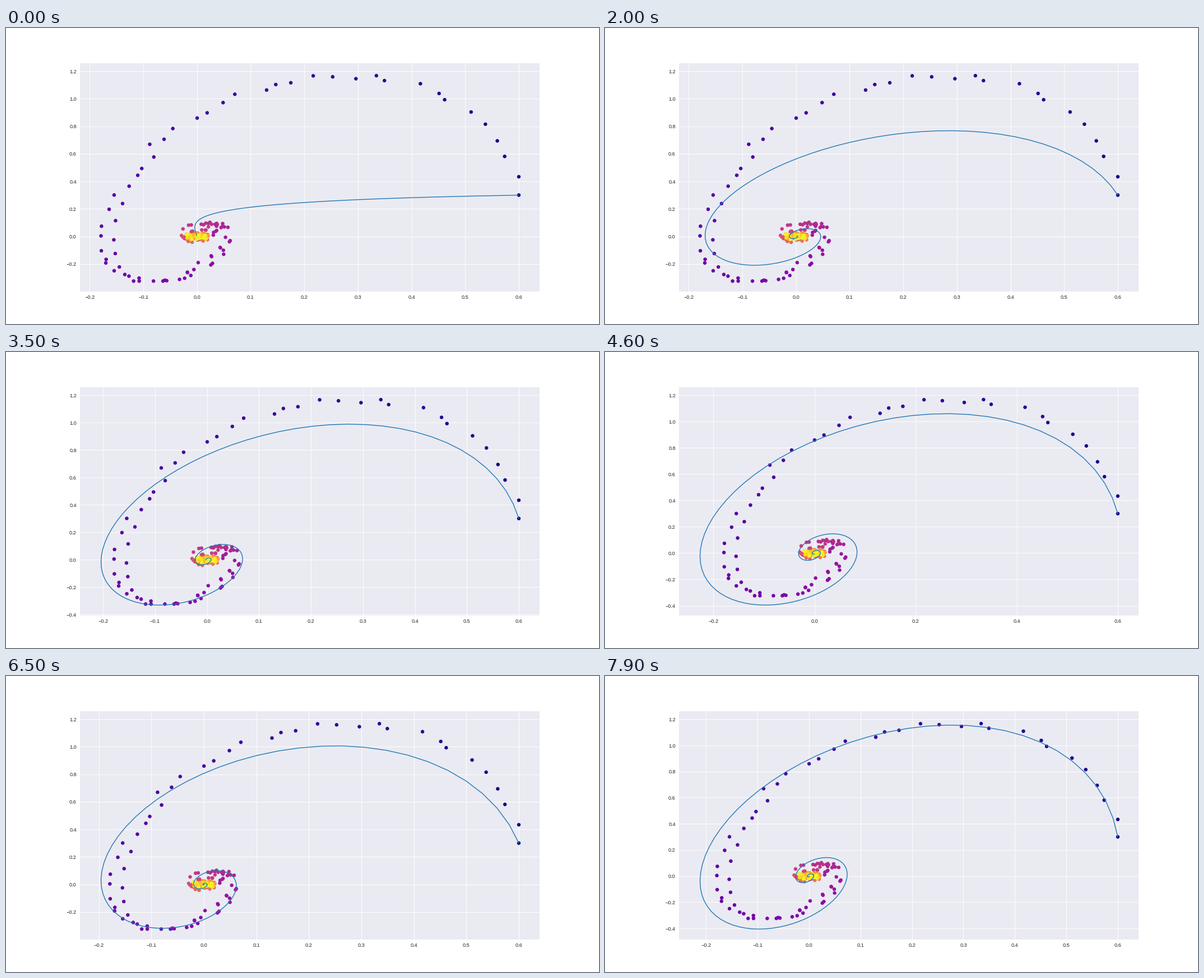
Recreate the animation shown at these times as a matplotlib script. Size 1058 by 529 pixels, loop 8000 ms.

```python
import numpy as np
import matplotlib.pyplot as plt
from matplotlib.animation import FuncAnimation

FRAMES, INTERVAL, STEPS = 80, 100, 200
START = np.array([0.6, 0.3])

# Extent of the noisy measurements
LOW, HIGH = np.array([-0.179, -0.3235]), np.array([0.6, 1.18])

# Linear system (x' = ax + by, y' = cx + dy per step) behind the measurements
TRUE_SYSTEM = -0.0025, -0.031, 0.298, -0.0704

# Key points of the learned coefficients, times in seconds
TIMES = [0, 0.9, 2.0, 3.5, 4.6, 5.8, 7.2, 7.9]
A_KEYS = [-0.0704, -0.05, -0.0016, 0.0029, 0.0038, -0.0124, 0.0007, 0.0063]
B_KEYS = [-0.0045, -0.036, -0.0372, -0.0348, -0.0364, -0.0475, -0.0328, -0.0347]
D_KEYS = [-0.0198, -0.07, -0.0565, -0.0587, -0.0591, -0.0651, -0.0688, -0.0674]

plt.rcParams.update({
    "font.family": "Liberation Sans",
    "font.size": 10,
    "axes.facecolor": "#eaeaf2",
    "axes.linewidth": 0,
    "axes.axisbelow": True,
    "axes.grid": True,
    "grid.color": "white",
    "grid.linewidth": 1,
    "xtick.color": "0.15",
    "ytick.color": "0.15",
    "xtick.major.size": 0,
    "ytick.major.size": 0,
    "xtick.major.pad": 7,
    "ytick.major.pad": 7,
    "lines.solid_capstyle": "round",
})


def trajectory(system):
    """Sample the linear system from START with an exact step matrix."""
    matrix = np.reshape(system, (2, 2))
    step, term = np.eye(2), np.eye(2)
    for n in range(1, 7):
        term = term @ matrix / n
        step = step + term
    path = [START]
    for _ in range(STEPS - 1):
        path.append(step @ path[-1])
    return np.array(path)


def learned_system(t):
    """The dominant coefficient c saturates; the others follow key points."""
    a, b, d = (np.interp(t, TIMES, keys) for keys in (A_KEYS, B_KEYS, D_KEYS))
    c = 0.005 + 0.295 * (1 - np.exp(-t / 2.9))
    return a, b, c, d


rng = np.random.default_rng(4)
data = trajectory(TRUE_SYSTEM) + rng.uniform(-0.02, 0.02, (STEPS, 2))
data = np.clip(data, LOW, HIGH)

fig, ax = plt.subplots(figsize=(16, 8), dpi=66.125)
fig.subplots_adjust(left=0.125, right=0.9, bottom=0.11, top=0.88)
ax.scatter(*data.T, c=np.linspace(0, 1, STEPS), cmap="plasma",
           s=36, linewidths=1, zorder=1)
line, = ax.plot([], [], color="#1f77b4", lw=1.5, zorder=2)


def update(frame):
    path = trajectory(learned_system(frame * INTERVAL / 1000))
    line.set_data(*path.T)
    low = np.minimum(LOW, path.min(axis=0))
    high = np.maximum(HIGH, path.max(axis=0))
    margin = 0.05 * (high - low)
    (left, bottom), (right, top) = low - margin, high + margin
    ax.set(xlim=(left, right), ylim=(bottom, top))
    return line,


anim = FuncAnimation(fig, update, frames=FRAMES, interval=INTERVAL,
                     repeat=True, repeat_delay=0, blit=False)
plt.show()
```
